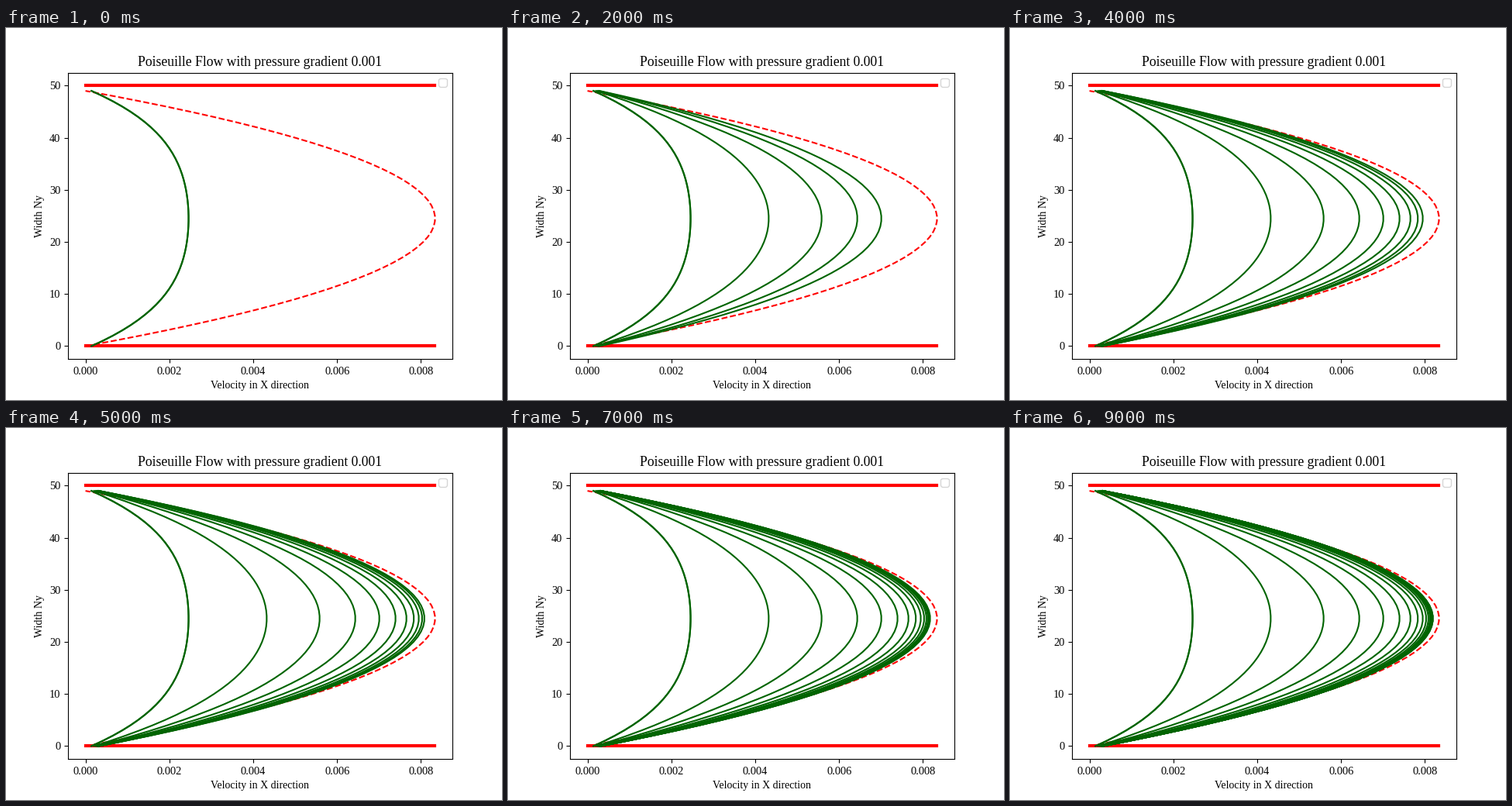
A matplotlib script that plays this animation: 640x480 px, repeating every 9500 ms.

```python
import numpy as np
import matplotlib.pyplot as plt
from matplotlib.animation import FuncAnimation

plt.rcParams["font.family"] = "Liberation Serif"

FRAMES, INTERVAL = 19, 500
NY = 50
U_MAX = 1 / 120          # peak of the analytic profile
U_END = 0.98337 * U_MAX  # peak the developing flow settles at
DECAY = 0.3945           # decay of the slowest mode per step
START = 0.98             # time of the first profile, in steps

y = np.arange(NY)


def profile(step):
    """Start-up Poiseuille flow between walls half a cell outside the grid."""
    s = (y + 0.5) / NY
    u = 4 * s * (1 - s)
    for n in (1, 3, 5):
        fade = np.exp(-n * n * DECAY * (step + START))
        u = u - 32 / (n * np.pi) ** 3 * np.sin(n * np.pi * s) * fade
    return U_END * u


fig, ax = plt.subplots(figsize=(6.4, 4.8), dpi=100)
analytic = y * (NY - 1 - y) / 600 * U_MAX

for wall in (0, NY):
    ax.plot([0, U_MAX], [wall, wall], color="red", lw=3)
ax.plot(analytic, y, "--", color="red", lw=1.5)

# the first profile is laid down twice, which firms up its edges
steps = [0, *range(FRAMES)]
curves = [ax.plot(profile(k), y, color="darkgreen", lw=1.5)[0] for k in steps]

ax.set_title("Poiseuille Flow with pressure gradient 0.001", fontsize=12.7)
ax.set_xlabel("Velocity in X direction", fontsize=10)
ax.set_ylabel("Width Ny", fontsize=10)
ax.tick_params(labelsize=10.4)
ax.set_xticks(np.arange(5) * 0.002)
ax.legend([], [], loc="upper right")


def update(frame):
    for k, curve in zip(steps, curves):
        curve.set_visible(k <= frame)
    return curves


anim = FuncAnimation(fig, update, frames=FRAMES, interval=INTERVAL,
                     init_func=lambda: update(0), repeat=True, repeat_delay=0)
plt.show()
```
